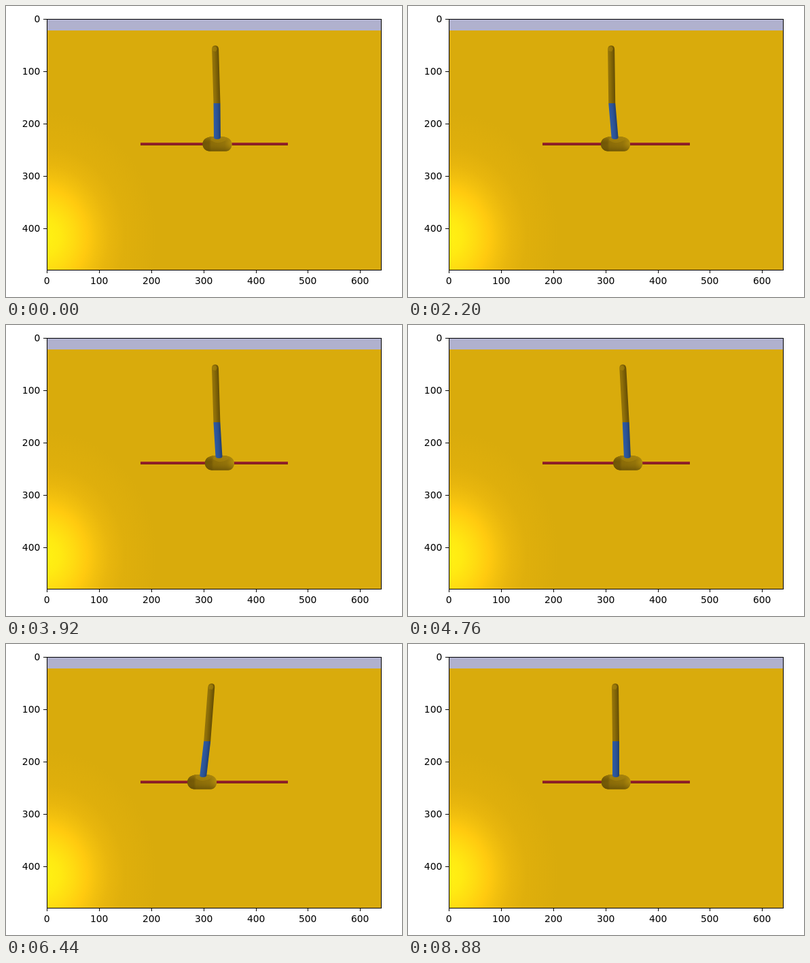
An HTML page that plays this animation: 583x428 px, repeating every 8920 ms.

```html
<!DOCTYPE html>
<html lang="en">
<head>
<meta charset="utf-8">
<title>Double pendulum on a cart</title>
<style>
html, body { margin: 0; width: 100%; height: 100%; overflow: hidden; background: #fff; }
svg { display: block; }
text { font: 13.89px "DejaVu Sans", sans-serif; fill: #000; }
.line { stroke: #000; fill: none; shape-rendering: crispEdges; }
</style>
</head>
<body>
<svg id="stage" width="583" height="428" viewBox="0 0 583 428">
  <defs>
    <radialGradient id="glow" gradientUnits="userSpaceOnUse" cx="0" cy="0" r="1"
      gradientTransform="translate(54 340) scale(168 185)">
      <stop offset="0" stop-color="#fff313"/>
      <stop offset=".15" stop-color="#ffea12"/>
      <stop offset=".27" stop-color="#ffdb11"/>
      <stop offset=".39" stop-color="#ffca0f"/>
      <stop offset=".48" stop-color="#f2c00e"/>
      <stop offset=".58" stop-color="#e8b60d"/>
      <stop offset=".72" stop-color="#dfaf0c"/>
      <stop offset="1" stop-color="#d9ab0c"/>
    </radialGradient>
    <linearGradient id="gold">
      <stop offset="0" stop-color="#94740a"/>
      <stop offset=".3" stop-color="#8d6e08"/>
      <stop offset=".6" stop-color="#7c6006"/>
      <stop offset="1" stop-color="#644d05"/>
    </linearGradient>
    <linearGradient id="blue">
      <stop offset="0" stop-color="#2f5ca4"/>
      <stop offset=".55" stop-color="#2b5294"/>
      <stop offset="1" stop-color="#223f70"/>
    </linearGradient>
    <linearGradient id="body">
      <stop offset="0" stop-color="#6e5406"/>
      <stop offset=".22" stop-color="#755a06"/>
      <stop offset=".3" stop-color="#8b6c08"/>
      <stop offset=".75" stop-color="#94740a"/>
      <stop offset="1" stop-color="#b48e0d"/>
    </linearGradient>
    <linearGradient id="shade" x2="0" y2="1">
      <stop offset="0" stop-color="#c59c10" stop-opacity=".5"/>
      <stop offset=".45" stop-color="#8a6c08" stop-opacity="0"/>
      <stop offset="1" stop-color="#5a4504" stop-opacity=".6"/>
    </linearGradient>
  </defs>

  <rect x="60" y="19" width="492" height="369" fill="url(#glow)"/>
  <rect x="60" y="19" width="492" height="17" fill="#b0b1ce"/>
  <rect x="198" y="201" width="217" height="4" fill="#93222a"/>
  <rect x="198" y="204" width="217" height="1" fill="#74181c"/>

  <g id="cart">
    <path id="hull" d="M-14-9.5Q-9-12-3-10.5Q2-12 10-10.5C17-10 21.5-5 21.5 0C21.5 6 18 10.5 13 10.5H-11C-17 10.5-21.5 6-21.5 0C-21.5-4-19-8-14-9.5Z" fill="url(#body)"/>
    <use href="#hull" style="fill:url(#shade)"/>
    <path d="M-14-9.5Q-9-12-3-10.5Q2-12 10-10.5C17-10 21.5-5 21.5 0C21.5 6 18 10.5 13 10.5H-11C-17 10.5-21.5 6-21.5 0C-21.5-4-19-8-14-9.5Z" fill="url(#shade)"/>
    <path d="M-10-6Q0 2 12-5Q15-8 11-9H-8Z" fill="#a9850c" opacity=".55"/>
  </g>
  <path id="lower" d="M-5 0H5V50Q5 53 0 53Q-5 53-5 50Z" fill="url(#blue)"/>
  <path id="upper" d="M-5 0V-79Q-5-85 0-85Q5-85 5-79V0Z" fill="url(#gold)"/>
  <path id="cap" d="M-4 4L-4.2 0Q-2-3 1-2.5L3 1L1 5Z" fill="#a9860c" opacity=".6"/>

  <rect class="line" x="60.5" y="19.5" width="492" height="369"/>
  <g id="ticks"></g>
</svg>
<script>
const JOINT_Y = 143, BASE_Y = 196, TIP_Y = 58;
const STEP = 40, LOOP = 8920;

// time in ms, then x of cart, lower pole foot, joint and tip
const poses = [
  [0, 311, 311, 310.5, 308],
  [1360, 310.7, 310, 305, 302],
  [3120, 302.5, 302, 298.7, 299],
  [4760, 323.7, 323, 320.7, 316],
  [6440, 288.6, 290, 296.2, 302.7],
  [7480, 297.5, 297.5, 298.2, 299],
  [8880, 306.2, 306, 306, 305]
];

const byId = id => document.getElementById(id);
const place = (id, x, y, lean = 0) =>
  byId(id).setAttribute("transform", `matrix(1 0 ${lean} 1 ${x} ${y})`);

function slope(i, k) {
  const a = poses[Math.max(i - 1, 0)], b = poses[Math.min(i + 1, poses.length - 1)];
  return (b[k] - a[k]) / (b[0] - a[0]);
}

// cubic Hermite between neighbouring poses
function poseAt(t) {
  let i = 0;
  while (i < poses.length - 2 && t >= poses[i + 1][0]) i++;
  const a = poses[i], b = poses[i + 1], h = b[0] - a[0], u = (t - a[0]) / h;
  const s = u * u * (3 - 2 * u);
  return [1, 2, 3, 4].map(k => a[k] + (b[k] - a[k]) * s
    + h * u * (1 - u) * ((1 - u) * slope(i, k) - u * slope(i + 1, k)));
}

function draw(now) {
  const t = Math.floor((now % LOOP) / STEP) * STEP;
  const [cart, foot, joint, tip] = poseAt(t);
  place("cart", cart, 203);
  place("lower", joint, JOINT_Y, (foot - joint) / (BASE_Y - JOINT_Y));
  place("upper", joint, JOINT_Y, (joint - tip) / (JOINT_Y - TIP_Y));
  place("cap", tip, 62);
  requestAnimationFrame(draw);
}

function addTicks() {
  const unit = 492 / 640;
  let out = "";
  for (let v = 0; v <= 600; v += 100) {
    const x = Math.round(60 + v * unit), y = Math.round(19 + v * unit);
    out += `<path class="line" d="M${x + .5} 389v4"/>
      <text x="${x + .2}" y="409" text-anchor="middle">${v}</text>`;
    if (v < 480) out += `<path class="line" d="M55 ${y + .5}h5"/>
      <text x="50.3" y="${y + 5}" text-anchor="end">${v}</text>`;
  }
  byId("ticks").innerHTML = out;
}

addTicks();
draw(performance.now());
</script>
</body>
</html>
```
